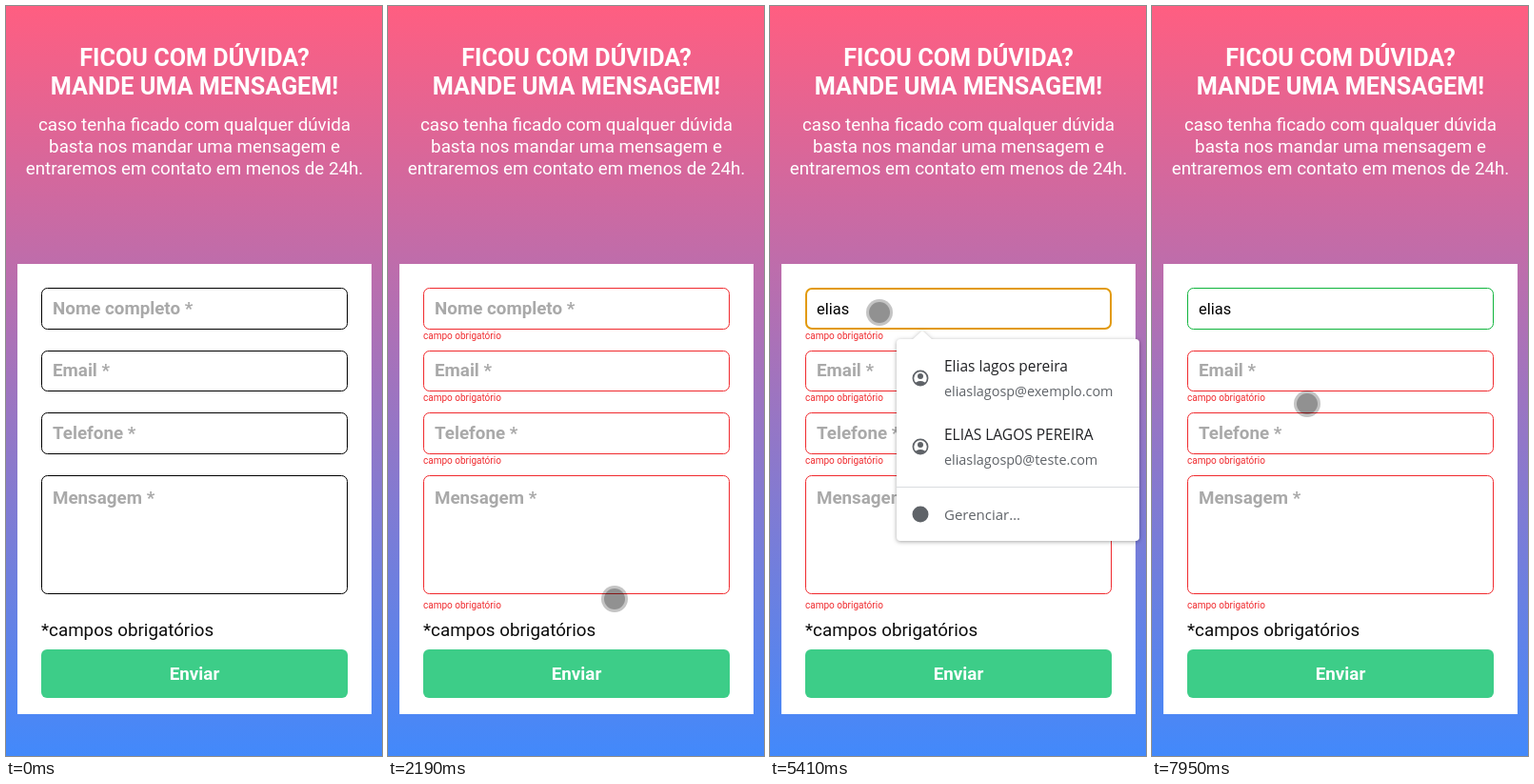
Write an HTML page with a canvas that moves like this. It is 395 px wide and 788 px high and loops after 8000 ms.

```html
<!DOCTYPE html>
<html lang="pt-BR">
<head>
<meta charset="utf-8">
<title>Formulário de contato</title>
<style>
  html, body { margin: 0; width: 100%; height: 100%; overflow: hidden; }
  canvas { display: block; width: 395px; height: 788px; }
</style>
</head>
<body>
<canvas id="stage"></canvas>
<script>
const W = 395, H = 788, LOOP = 8000;
const canvas = document.getElementById('stage');
const ctx = canvas.getContext('2d');
const dpr = window.devicePixelRatio || 1;
canvas.width = W * dpr;
canvas.height = H * dpr;

const BODY = 'Roboto, sans-serif';
const MENU = '"Open Sans", "Noto Sans", sans-serif';
const RED = '#f02a2e', GREEN = '#0fb43c', ORANGE = '#e29a0b', GREY = '#5f6368';

// Moments in ms
const SUBMIT = 1780, FOCUS = 3350, BLUR = 6330, SQUIGGLE = 5910;
const WORD = 'elias';
const KEY_TIMES = [4290, 4420, 4550, 4750, 4880];
const CARET_OFF = [[3830, 4290], [5410, 5910]];
const PRESSES = [[1200, 1540], [3010, 3350], [6000, 6340]];

const FIELDS = [
  { label: 'Nome completo *', y: 296, h: 44, base: 324, error: 350 },
  { label: 'Email *', y: 362, h: 43, base: 389, error: 415 },
  { label: 'Telefone *', y: 427, h: 44, base: 455, error: 481 },
  { label: 'Mensagem *', y: 493, h: 125, base: 523, error: 633 }
];

const CONTACTS = [
  ['Elias lagos pereira', 'eliaslagosp@exemplo.com'],
  ['ELIAS LAGOS PEREIRA', 'eliaslagosp0@teste.com'],
  ['Paulo lagos pereira', 'paulolagos@exemplo.com']
];

// Pointer path: time, x, y
const PATH = [
  [190, 356, 556], [300, 320, 543], [460, 205, 566], [620, 150, 630],
  [700, 145, 685], [800, 172, 728], [930, 200, 725], [1900, 200, 725],
  [2190, 238, 623], [2400, 222, 520], [2530, 193, 444], [2600, 193, 444],
  [2850, 140, 372], [3010, 115, 322], [5610, 115, 322], [5800, 140, 260],
  [6000, 183, 195], [6790, 183, 195], [6800, 180, 245], [6900, 180, 290],
  [7050, 215, 362], [7300, 262, 470], [7410, 272, 481], [7660, 272, 481],
  [7740, 265, 488], [7950, 163, 418], [8000, 163, 418]
];

const within = (t, [a, b]) => t >= a && t < b;

function text(str, x, y, size, color, { weight = 400, align = 'left', family = BODY } = {}) {
  ctx.font = `${weight} ${size}px ${family}`;
  ctx.textAlign = align;
  ctx.fillStyle = color;
  ctx.fillText(str, x, y);
}

function box(x, y, w, h, r) {
  ctx.beginPath();
  ctx.roundRect(x, y, w, h, r);
}

function disc(x, y, r, color) {
  ctx.beginPath();
  ctx.arc(x, y, r, 0, Math.PI * 2);
  ctx.fillStyle = color;
  ctx.fill();
}

function border(f, color, width) {
  const d = width / 2;
  box(37 + d, f.y + d, 322 - width, f.h - width, 6);
  ctx.strokeStyle = color;
  ctx.lineWidth = width;
  ctx.stroke();
}

function drawPage() {
  const sky = ctx.createLinearGradient(0, 0, 0, H);
  sky.addColorStop(0, '#ff5e81');
  sky.addColorStop(1, '#4289fb');
  ctx.fillStyle = sky;
  ctx.fillRect(0, 0, W, H);

  const title = { weight: 700, align: 'center' };
  text('FICOU COM DÚVIDA?', 198, 63, 25.2, '#fff', title);
  text('MANDE UMA MENSAGEM!', 198, 93, 25.2, '#fff', title);
  ['caso tenha ficado com qualquer dúvida',
   'basta nos mandar uma mensagem e',
   'entraremos em contato em menos de 24h.'
  ].forEach((line, i) => text(line, 198, 131 + i * 23, 18.8, '#fff', { align: 'center' }));

  ctx.fillStyle = '#fff';
  ctx.fillRect(12, 271, 372, 473);
  text('*campos obrigatórios', 37, 662, 18.8, '#0c0c0c');
  box(37, 676, 322, 51, 6);
  ctx.fillStyle = '#3dcd88';
  ctx.fill();
  text('Enviar', 198, 708, 18.8, '#fff', title);
}

function drawFields(t, typed) {
  const focused = within(t, [FOCUS, BLUR]);
  FIELDS.forEach((f, i) => {
    const valid = i === 0 && t >= BLUR;
    const failed = t >= SUBMIT && !valid;
    if (i === 0 && focused) border(f, ORANGE, 2);
    else border(f, valid ? GREEN : failed ? RED : '#000', 1);
    if (failed) text('campo obrigatório', 37, f.error, 10, RED);
    if (i === 0 && typed) text(typed, 49, f.base, 16.45, '#000');
    else text(f.label, 49, f.base, 18.8, '#a9a9a9', { weight: 700 });
  });
  if (focused) drawCaret(t, typed);
}

function drawCaret(t, typed) {
  ctx.font = `400 16.45px ${BODY}`;
  const end = 49 + ctx.measureText(typed).width;
  if (t >= SQUIGGLE) {
    ctx.beginPath();
    for (let x = 49; x <= end; x += 0.5) ctx.lineTo(x, 326 + Math.sin((x - 49) * 1.4) * 1.2);
    ctx.strokeStyle = '#e5242a';
    ctx.lineWidth = 1.2;
    ctx.stroke();
  }
  if (!CARET_OFF.some(span => within(t, span))) {
    ctx.fillStyle = '#000';
    ctx.fillRect(Math.round(end), 308, 1.5, 20);
  }
}

function drawPerson(x, y) {
  ctx.save();
  ctx.beginPath();
  ctx.arc(x, y, 7.6, 0, Math.PI * 2);
  ctx.strokeStyle = GREY;
  ctx.lineWidth = 1.7;
  ctx.stroke();
  ctx.clip();
  disc(x, y - 2, 3, GREY);
  ctx.beginPath();
  ctx.ellipse(x, y + 7, 6, 4, 0, 0, Math.PI * 2);
  ctx.fill();
  ctx.restore();
}

function drawMenu(count) {
  const bottom = 418 + count * 72;
  ctx.save();
  ctx.shadowColor = 'rgba(0,0,0,.35)';
  ctx.shadowBlur = 4 * dpr;
  ctx.shadowOffsetY = dpr;
  ctx.fillStyle = '#fff';
  box(133, 350, 255, bottom - 350, 4);
  ctx.moveTo(150, 350);
  ctx.lineTo(160, 341);
  ctx.lineTo(170, 350);
  ctx.fill();
  ctx.restore();

  CONTACTS.slice(0, count).forEach(([name, mail], i) => {
    const y = i * 72;
    drawPerson(158, 391 + y);
    text(name, 183, 384 + y, 15.5, '#202124', { family: MENU });
    text(mail, 183, 410 + y, 14.4, GREY, { family: MENU });
  });
  ctx.fillStyle = '#dadce0';
  ctx.fillRect(133, bottom - 57, 255, 1);
  disc(158, bottom - 28, 8.5, GREY);
  text('Gerenciar…', 183, bottom - 22, 15, GREY, { family: MENU });
}

function drawPointer(t) {
  const i = PATH.findIndex(p => p[0] > t);
  if (i < 1) return;
  const [t0, x0, y0] = PATH[i - 1], [t1, x1, y1] = PATH[i];
  const k = (t - t0) / (t1 - t0);
  const x = x0 + (x1 - x0) * k, y = y0 + (y1 - y0) * k;
  const pressed = PRESSES.some(span => within(t, span));
  disc(x, y, pressed ? 15 : 14, pressed ? 'rgba(205,175,30,.7)' : 'rgba(0,0,0,.23)');
  disc(x, y, pressed ? 12 : 11, pressed ? 'rgba(140,150,10,.3)' : 'rgba(0,0,0,.26)');
}

function draw(t) {
  ctx.setTransform(dpr, 0, 0, dpr, 0, 0);
  const typed = WORD.slice(0, KEY_TIMES.filter(k => t >= k).length);
  drawPage();
  drawFields(t, typed);
  if (within(t, [FOCUS, BLUR])) drawMenu(typed ? 2 : 3);
  drawPointer(t);
}

let start;
function tick(now) {
  start ??= now;
  draw((now - start) % LOOP);
  requestAnimationFrame(tick);
}
draw(0);
requestAnimationFrame(tick);
</script>
</body>
</html>
```
